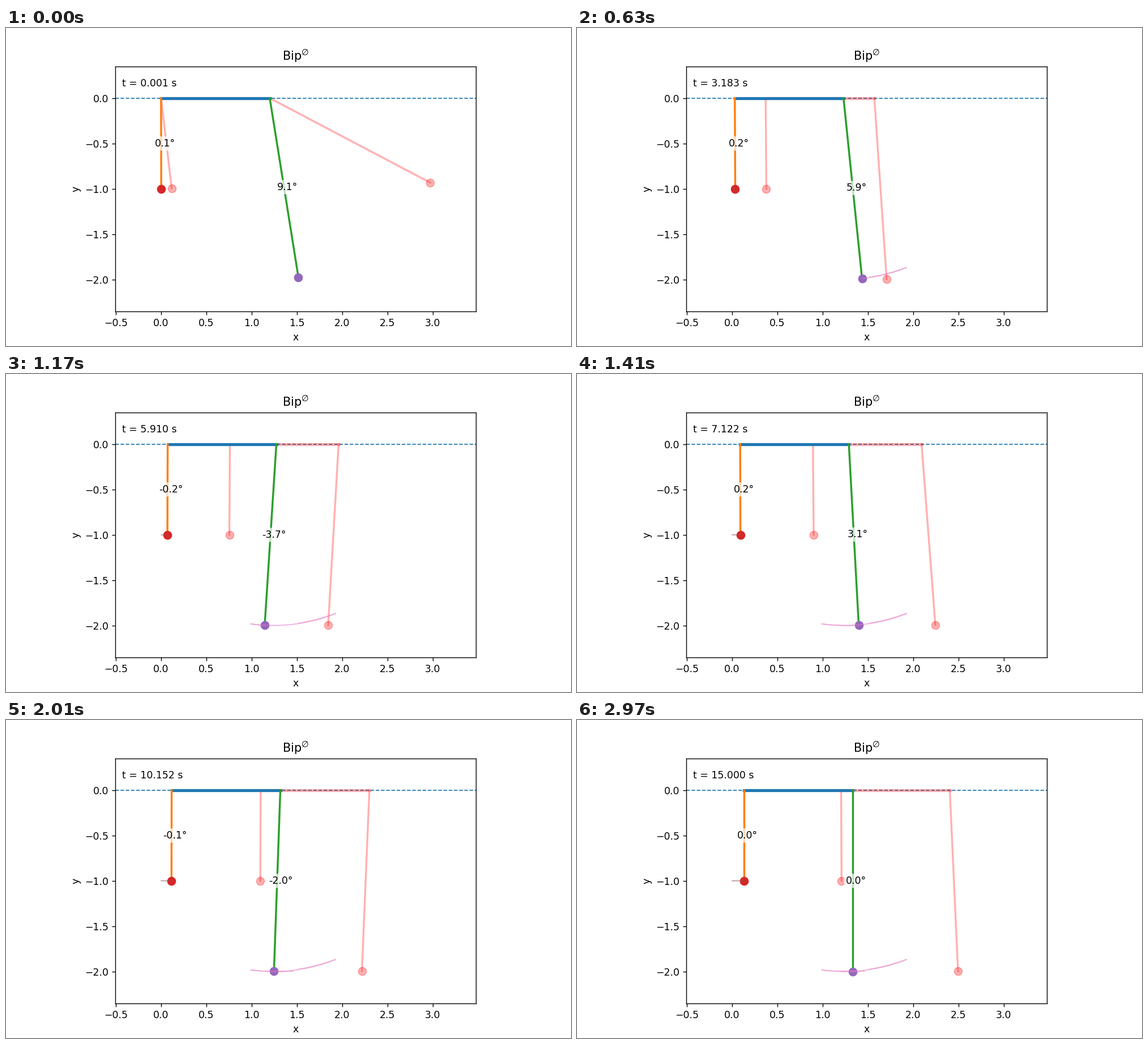
Recreate the animation shown at these times as a matplotlib script. Size 998 px wide and 561 px high, loop 3 s.

```python
import numpy as np
import matplotlib.pyplot as plt
from matplotlib.animation import FuncAnimation

W, H, DPI = 998, 561, 125
FRAMES, INTERVAL, END = 100, 30, 15
BEAM, L1, L2 = 1.2, 1.0, 2.0
t = np.linspace(0.001, END, FRAMES)


def swing(start, first, step, stiff, drag, sign):
    """Cosine-eased swing whose inverse amplitude grows evenly per half turn."""
    k = np.arange(7)
    turns = np.append(0, first + step * k)
    peaks = np.append(start, sign * (-1.0) ** k / (stiff + drag * k))
    j = np.searchsorted(turns, t, side="right") - 1
    s = (t - turns[j]) / (turns[j + 1] - turns[j])
    return peaks[j] + (peaks[j + 1] - peaks[j]) * (1 - np.cos(np.pi * s)) / 2


def drift(reach, tau, power):
    return reach * (1 - np.exp(-(t / tau) ** power))


def bob(x, th, length):
    return x + length * np.sin(th), -length * np.cos(th)


# Cart position and pendulum angles (rad)
settle = np.clip((END - t) / 1.5, 0, 1)
cart = drift(0.133, 6.7, 1.8)
th2 = settle * swing(0.1588, 1.55, 3.15, 2.72, 4.75, 1)
th1 = th2 * np.minimum(0.012 + 0.0095 * t, 0.05)

# Faded comparison system
ghost_cart = drift(1.22, 6, 1.6)
ghost_th2 = swing(1.0865, 4.45, 3.3, 6, 4.1, -1)
ghost_th1 = 0.108 * ghost_th2

fig, ax = plt.subplots(figsize=(W / DPI, H / DPI), dpi=DPI)
fig.subplots_adjust(bottom=0.1093, top=0.8793)
ax.set_aspect("equal")
ax.set_xlim(-0.505, 3.475)
ax.set_ylim(-2.35, 0.35)
ax.set_xlabel("x")
ax.set_ylabel("y")
ax.set_title(r"Bip$^{\varnothing}$")
ax.axhline(0, ls="--", lw=1)


class System:
    def __init__(self, x, a1, a2, colors, alpha=1):
        self.x = x
        self.bobs = bob(x, a1, L1), bob(x + BEAM, a2, L2)

        def line(color, **kw):
            return ax.plot([], [], color=color, alpha=alpha, **kw)[0]

        self.beam = line(colors[0], lw=3)
        self.rods = [line(c, lw=2) for c in colors[1:3]]
        self.dots = [line(c, marker="o", ms=8, ls="") for c in colors[3:5]]

    def draw(self, i):
        x = self.x[i]
        self.beam.set_data([x, x + BEAM], [0, 0])
        for rod, dot, (bx, by), top in zip(self.rods, self.dots, self.bobs,
                                           (x, x + BEAM)):
            rod.set_data([top, bx[i]], [0, by[i]])
            dot.set_data([bx[i]], [by[i]])


ghost = System(ghost_cart, ghost_th1, ghost_th2, ["red"] * 5, alpha=0.3)
main = System(cart, th1, th2, ["C0", "C1", "C2", "C3", "C4"])
trails = [ax.plot([], [], color=c, lw=1, alpha=0.6)[0] for c in ("C5", "C6")]

clock = ax.text(0.018, 0.95, "", transform=ax.transAxes, va="top")
box = dict(boxstyle="round,pad=0.2", fc="white", ec="none", alpha=0.7)
labels = [ax.text(0, 0, "", ha="center", va="center", bbox=box)
          for _ in range(2)]


def update(i):
    ghost.draw(i)
    main.draw(i)
    for trail, (bx, by) in zip(trails, main.bobs):
        trail.set_data(bx[:i + 1], by[:i + 1])
    arms = (cart[i], th1[i], L1), (cart[i] + BEAM, th2[i], L2)
    for label, (x, th, length) in zip(labels, arms):
        mx, my = bob(x, th, length / 2)
        label.set_position((mx + 0.04 * np.cos(th), my + 0.04 * np.sin(th)))
        label.set_text(f"{np.degrees(th):.1f}°")
    clock.set_text(f"t = {t[i]:.3f} s")
    return []


anim = FuncAnimation(fig, update, frames=FRAMES, init_func=lambda: update(0),
                     interval=INTERVAL, repeat=True, repeat_delay=0)
plt.show()
```
